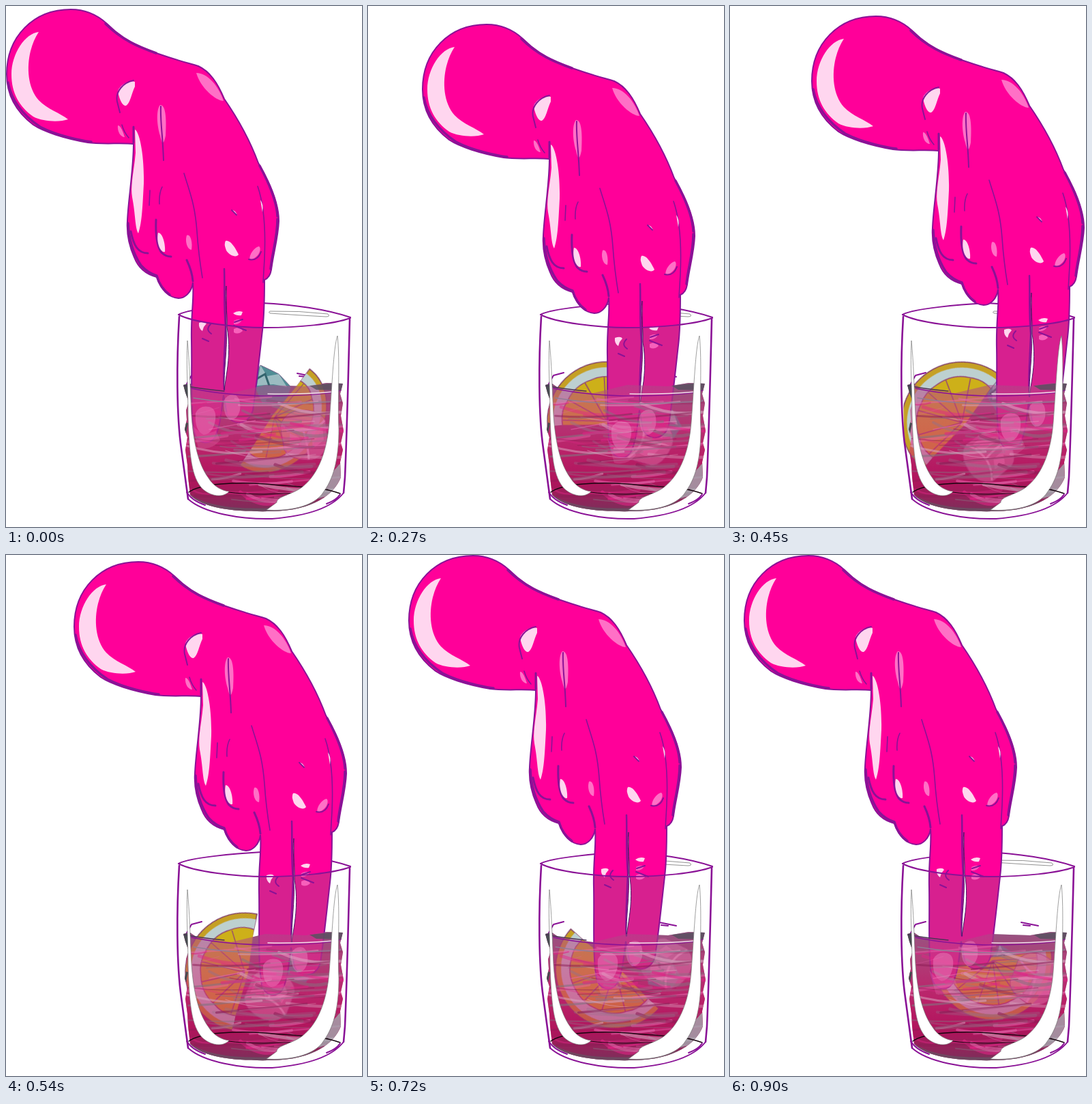
Recreate the animation shown at these times as an HTML page. Size 522 by 763 pixels, loop 0.99 s.

```html
<!DOCTYPE html>
<html lang="en">
<head>
<meta charset="utf-8">
<title>Stirring a drink</title>
<style>
  html, body { margin: 0; width: 100%; height: 100%; overflow: hidden; background: #fff; }
  svg { display: block; width: 522px; height: 763px; }
  .hand, .slice, .cube, .chip { animation: hand 990ms step-end infinite; }
  .slice { animation-name: slice; }
  .cube { animation-name: cube; }
  .chip { animation-name: chip; }
  .ink { fill: none; stroke: #8a1296; stroke-width: 2; stroke-linecap: round; stroke-linejoin: round; }
  .pale { fill: #ffd6ef; }
  .soft { fill: #ff70c6; }

  @keyframes hand {
    0% { transform: translate(0, 0); }
    9.0909% { transform: translate(39px, 18px); }
    18.1818% { transform: translate(59px, 21px); }
    27.2727% { transform: translate(79px, 22px); }
    36.3636% { transform: translate(99px, 17px); }
    45.4545% { transform: translate(119px, 10px); }
    54.5454% { transform: translate(99px, 5px); }
    63.6363% { transform: translate(79px, 0); }
    72.7272% { transform: translate(59px, -4px); }
    81.8181% { transform: translate(39px, -5px); }
    90.909% { transform: translate(20px, -4px); }
  }
  @keyframes slice {
    0% { transform: translate(394px, 602px) rotate(36deg) scaleX(.8); }
    9.0909% { transform: translate(386px, 605px) rotate(8deg) scaleX(.7); }
    18.1818% { transform: translate(365px, 605px) rotate(-45deg); }
    27.2727% { transform: translate(350px, 608px) rotate(-95deg); }
    36.3636% { transform: translate(345px, 610px) rotate(-118deg); }
    45.4545% { transform: translate(340px, 610px) rotate(-140deg) scale(1.02); }
    54.5454% { transform: translate(350px, 611px) rotate(-168deg); }
    63.6363% { transform: translate(360px, 612px) rotate(-196deg); }
    72.7272% { transform: translate(362px, 606px) rotate(-228deg); }
    81.8181% { transform: translate(372px, 600px) rotate(-255deg); }
    90.909% { transform: translate(385px, 594px) rotate(-280deg); }
  }
  @keyframes cube {
    0% { transform: translate(436px, 628px) rotate(0deg); }
    9.0909% { transform: translate(438px, 595px) rotate(-25deg); }
    18.1818% { transform: translate(425px, 618px) rotate(-45deg); }
    27.2727% { transform: translate(408px, 638px) rotate(-65deg); }
    36.3636% { transform: translate(392px, 650px) rotate(-90deg); }
    45.4545% { transform: translate(380px, 660px) rotate(-120deg); }
    54.5454% { transform: translate(388px, 645px) rotate(-150deg); }
    63.6363% { transform: translate(402px, 632px) rotate(-180deg); }
    72.7272% { transform: translate(438px, 597px) rotate(-235deg); }
    81.8181% { transform: translate(438px, 606px) rotate(-280deg); }
    90.909% { transform: translate(446px, 620px) rotate(-330deg); }
  }
  @keyframes chip {
    0% { transform: translate(388px, 554px); }
    9.0909% { transform: translate(424px, 600px) rotate(30deg); }
    18.1818% { transform: translate(430px, 606px) rotate(20deg); }
    27.2727% { transform: translate(432px, 604px) rotate(15deg); }
    36.3636% { transform: translate(415px, 595px) rotate(5deg); }
    45.4545% { transform: translate(404px, 572px) rotate(-8deg); }
    54.5454% { transform: translate(425px, 595px) rotate(15deg); }
    63.6363% { transform: translate(446px, 602px) rotate(25deg); }
    72.7272% { transform: translate(430px, 605px) rotate(15deg); }
    81.8181% { transform: translate(420px, 597px) rotate(10deg); }
    90.909% { transform: translate(408px, 600px) rotate(5deg); }
  }
</style>
</head>
<body>
<svg viewBox="0 0 522 763" xmlns="http://www.w3.org/2000/svg">
  <defs>
    <linearGradient id="wine" x1="0" y1="0" x2="0" y2="1">
      <stop offset="0" stop-color="#80607a"/>
      <stop offset=".2" stop-color="#8f466f"/>
      <stop offset=".45" stop-color="#9c2a62"/>
      <stop offset=".75" stop-color="#a31656"/>
      <stop offset="1" stop-color="#6e3a5a"/>
    </linearGradient>
    <linearGradient id="tint" x1="0" y1="0" x2="0" y2="1">
      <stop offset="0" stop-color="#a84c88"/>
      <stop offset=".2" stop-color="#c93a80"/>
      <stop offset=".5" stop-color="#d42274"/>
      <stop offset=".8" stop-color="#b8125f"/>
      <stop offset="1" stop-color="#88285a"/>
    </linearGradient>
    <path id="pool" d="M260 555L270 553 280 560 330 567 380 555 440 557 470 552 494 553 490 568 494 582 491 600 495 622 491 640 494 650 490 668 491 690C482 715 450 739 390 740C340 741 290 737 270 716L267 690 266 672 263 650 266 632 262 620 265 606 264 592 268 580 263 566Z"/>
    <clipPath id="wet"><use href="#pool"/></clipPath>
    <clipPath id="over"><path d="M0 0H522V457H505C480 466 430 471 380 471C340 471 275 464 253 452H0Z"/></clipPath>
    <clipPath id="within"><path d="M253 452C275 464 340 471 380 471C430 471 480 466 505 457L497 700H265L255 640Z"/></clipPath>

    <g id="arm">
      <path d="M95 5C118 5 135 14 148 26C163 41 178 52 200 61C230 74 262 82 282 88C299 96 310 112 320 136C338 162 356 192 370 230C386 257 400 288 400 315C399 340 392 362 389 386Q387 398 379 401C379 430 379 450 376 475C372 510 368 550 362 592C356 614 332 616 324 598L319 570C316 590 315 615 306 632C296 645 280 640 276 624C270 590 273 540 272 490C271 450 276 430 274 405C272 420 262 428 253 428C238 427 227 415 221 397C205 393 194 384 188 368C180 350 177 330 178 315C179 285 187 240 187 202C170 200 140 203 120 200C85 194 55 184 40 174C15 155 1 130 1 100C1 45 40 5 95 5Z" fill="currentColor" stroke="#8a1296" stroke-width="2"/>
      <g class="ink">
        <path stroke-width="3.5" d="M3 112C8 140 25 160 50 177C75 190 110 197 125 199M179 318C180 345 188 365 198 380Q208 391 221 395Q226 413 240 423M398 312C398 340 390 362 388 385M146 26C170 50 195 60 220 69M372 234C386 260 397 285 398 308"/>
        <path stroke-width="3" d="M183 330C187 350 193 362 208 362M220 313C219 337 221 352 228 361Q234 367 242 367M265 372Q273 389 274 403M187 177L187 200"/>
        <path stroke-width="1.6" d="M261 245C270 275 277 290 280 330C282 360 285 380 288 398M211 270L210 292M229 265Q224 275 225 290M369 264C378 290 381 325 379 370L377 405M170 174Q173 185 180 193"/>
        <path stroke-width="2.5" d="M320 385C321 415 319 435 322 470C321 505 318 535 320 562"/>
      </g>
      <path d="M323 410C320 430 325 445 324 470C328 493 327 515 324 535L320 562C319 535 325 500 323 475Z" fill="#fff" stroke="#4b1768"/>
      <g class="pale">
        <path d="M48 38C28 40 8 70 8 100C8 128 20 148 40 162C55 170 80 170 91 166C80 157 60 151 48 138C32 120 30 90 36 66Q40 50 48 38Z"/>
        <path d="M189 111C180 107 164 118 164 126Q169 147 176 146C182 143 184 128 189 118Z"/>
        <path d="M189 181C196 184 203 220 202 260C200 300 199 318 194 333C189 325 190 305 185 280C182 262 188 240 190 215Z"/>
        <path d="M223 332C230 332 234 350 233 360C226 362 220 345 223 332Z"/>
        <path d="M322 344C330 342 338 358 341 364C338 369 328 366 323 358Q319 348 322 344Z"/>
        <path d="M373 284Q378 290 376 302ZM331 299Q337 299 339 307Z"/>
        <path d="M333 450Q340 445 347 448L345 453Q338 454 333 450ZM283 464Q292 461 294 465L290 470 288 476Q282 472 283 464Z"/>
      </g>
      <g class="soft">
        <path d="M279 98C296 98 312 118 319 139C308 139 285 120 279 98Z"/>
        <path d="M226 145C233 144 236 160 234 190Q230 210 226 190C220 170 221 150 226 145Z"/>
        <path d="M164 175C168 174 172 185 174 192C168 192 163 184 164 175Z"/>
        <path d="M265 336C270 333 274 345 272 357C266 357 262 345 265 336Z"/>
        <path d="M371 352C375 355 372 368 358 372C355 368 362 354 371 352Z"/>
        <path d="M334 461Q342 457 346 460Q342 467 334 466ZM334 473Q344 468 347 476Q340 482 334 478Z" opacity=".8"/>
      </g>
      <g class="ink" stroke-width="1.4">
        <path d="M187 109C172 112 160 125 163 140L167 156M227 147C226 170 230 190 231 226M356 371Q369 374 374 360M331 299L338 306M335 463L347 459M334 468L352 475M300 466Q292 474 301 480M288 487L297 491"/>
      </g>
    </g>

    <g id="lemon">
      <path d="M0 -87A87 87 0 0 1 0 87Z" fill="#c5a025" stroke="#7d3a68" stroke-width="1.4"/>
      <path d="M0 -79A79 79 0 0 1 0 79Z" fill="#bdd0d0"/>
      <path d="M0 -65Q20 -67 34 -55Q56 -43 62 -18Q69 0 62 20Q55 45 34 56Q18 67 0 64L-5 0Z" fill="#cdb019"/>
      <path d="M0 0L7 -64M0 0L36 -53M0 0L59 -27M0 0L66 2M0 0L57 32M0 0L31 56M-1 -65Q20 -67 34 -55Q56 -43 62 -18Q69 0 62 20Q55 45 34 56Q18 67 0 64" fill="none" stroke="#924275" stroke-width="1.4"/>
    </g>

    <g id="ice" stroke-linejoin="round">
      <path d="M-34 -14Q-26 -34 -6 -36Q22 -38 32 -22L36 14Q28 36 8 37Q-22 36 -28 22Z" fill="#d9a2c2" fill-opacity=".65" stroke="#a04d86"/>
      <path d="M-32 -14Q-16 -4 0 -6Q22 -10 31 -21M0 -6Q7 16 8 36" fill="none" stroke="#e9bdd7" stroke-width="3"/>
      <path d="M-20 -2L-6 4 -2 22 -20 15ZM12 -4L28 -12 30 8 14 20Z" fill="#ee9fca" fill-opacity=".7"/>
    </g>
  </defs>

  <path class="ink" d="M253 452C268 443 340 437 375 435C420 437 470 444 505 456"/>
  <path d="M387 447Q430 446 472 451Q476 455 469 455Q430 453 387 450Q384 448 387 447Z" fill="#fff" stroke="#777" stroke-width=".8"/>
  <path class="ink" d="M263 557L272 541 287 537M427 538L452 543M430 542L440 543" stroke-width="1.3"/>
  <use href="#pool" fill="url(#wine)"/>

  <g clip-path="url(#over)" color="#ff0099"><g class="hand"><use href="#arm"/></g></g>

  <g clip-path="url(#within)">
    <g class="chip">
      <path d="M-27 -4L-15 -28 2 -20 12 -15 30 4 22 26 -12 28Z" fill="#4f8d94" stroke="#78638a"/>
      <path d="M-15 -28L-5 -12 12 -15 24 4 4 0 -20 2Z" fill="#b4cdd0" opacity=".75"/>
      <path d="M-22 -7L-8 -15 -2 2" fill="none" stroke="#34656e" stroke-width="3"/>
    </g>
    <g class="slice"><use href="#lemon"/></g>
    <g class="cube"><use href="#ice"/></g>
  </g>

  <g clip-path="url(#within)" color="#d7208f"><g class="hand"><use href="#arm"/></g></g>

  <use href="#pool" fill="url(#tint)" opacity=".54"/>
  <g clip-path="url(#wet)">
    <g id="streaks" fill="none" stroke-linecap="round"></g>
    <path d="M472 690L492 668 494 700 470 718 452 722Z" fill="#a3b4b4" opacity=".75"/>
    <path d="M268 714Q300 739 390 735T488 700L490 745H268Z" fill="#655765" opacity=".65"/>
    <path d="M259 553L271 554 266 576 259 572ZM258 608L267 611 264 626 258 623Z" fill="#474b50"/>
    <path d="M445 556L494 551 492 563 455 562Z" fill="#54505d" opacity=".8"/>
  </g>

  <g class="hand" fill="#ed8fc4" opacity=".42">
    <path d="M278 596Q284 584 298 587Q309 590 307 606Q304 626 290 628Q276 622 278 596Z"/>
    <path d="M320 577Q326 567 337 570Q345 575 343 592Q339 607 328 606Q317 598 320 577Z"/>
    <path d="M272 612Q285 632 308 622L314 636Q300 652 282 647Z" opacity=".5"/>
  </g>

  <g class="ink">
    <path d="M272 560Q330 572 400 571T491 563" stroke-width="1.3"/>
    <path d="M275 574Q340 585 420 582T490 578" stroke="#8f7d96" stroke-width="1.3"/>
    <path d="M384 568Q430 569 480 565" stroke="#f0dcea" stroke-width="1.5"/>
    <path d="M262 556Q280 560 320 564" stroke="#4d3357" stroke-width="1.3"/>
    <path d="M268 712C285 699 340 697 380 700C420 704 460 703 490 714" stroke="#17050f" stroke-width="1.4"/>
    <path d="M300 708Q370 722 472 708" stroke="#17050f" stroke-width="1"/>
    <path d="M253 452C275 464 340 471 380 471C430 471 480 466 505 457"/>
    <path d="M254 455C250 520 250 600 257 648L267 722M504 459C502 540 500 620 497 690L495 713" stroke-width="2.6"/>
    <path d="M267 722C290 743 345 752 390 751C440 747 478 735 495 713M265 712Q272 724 292 731M470 729Q484 724 490 715"/>
  </g>
  <g fill="#fff" stroke="#777" stroke-width=".7">
    <path d="M266 490C264 530 267 560 267 600C269 660 272 690 288 707C300 718 318 721 327 711C318 710 305 705 296 690C282 670 275 640 272 600C270 560 269 520 266 490Z"/>
    <path d="M486 483C480 500 478 560 474 610C471 648 460 684 435 704C420 716 397 718 397 727L382 738C410 740 452 735 466 711C483 688 488 655 488 620C486 580 490 520 486 483Z"/>
  </g>
</svg>
<script>
  let seed = 11;
  const rnd = () => (seed = seed * 16807 % 2147483647) / 2147483647;
  const tones = ['#e866ad', '#85707f', '#e02486', '#94708a', '#d8a0bd', '#8a1c55'];
  let marks = '';
  for (let i = 0; i < 80; i++) {
    const x = 250 + rnd() * 170, y = 575 + rnd() * 148;
    const w = 40 + rnd() * 110, tilt = (rnd() - .45) * 30;
    marks += `<path d="M${x} ${y}q${w / 2} ${tilt + 7} ${w} ${tilt}" stroke="${tones[i % 6]}"
      stroke-width="${1 + rnd() * 4}" opacity="${.25 + rnd() * .4}"/>`;
  }
  document.getElementById('streaks').innerHTML = marks;
</script>
</body>
</html>
```
